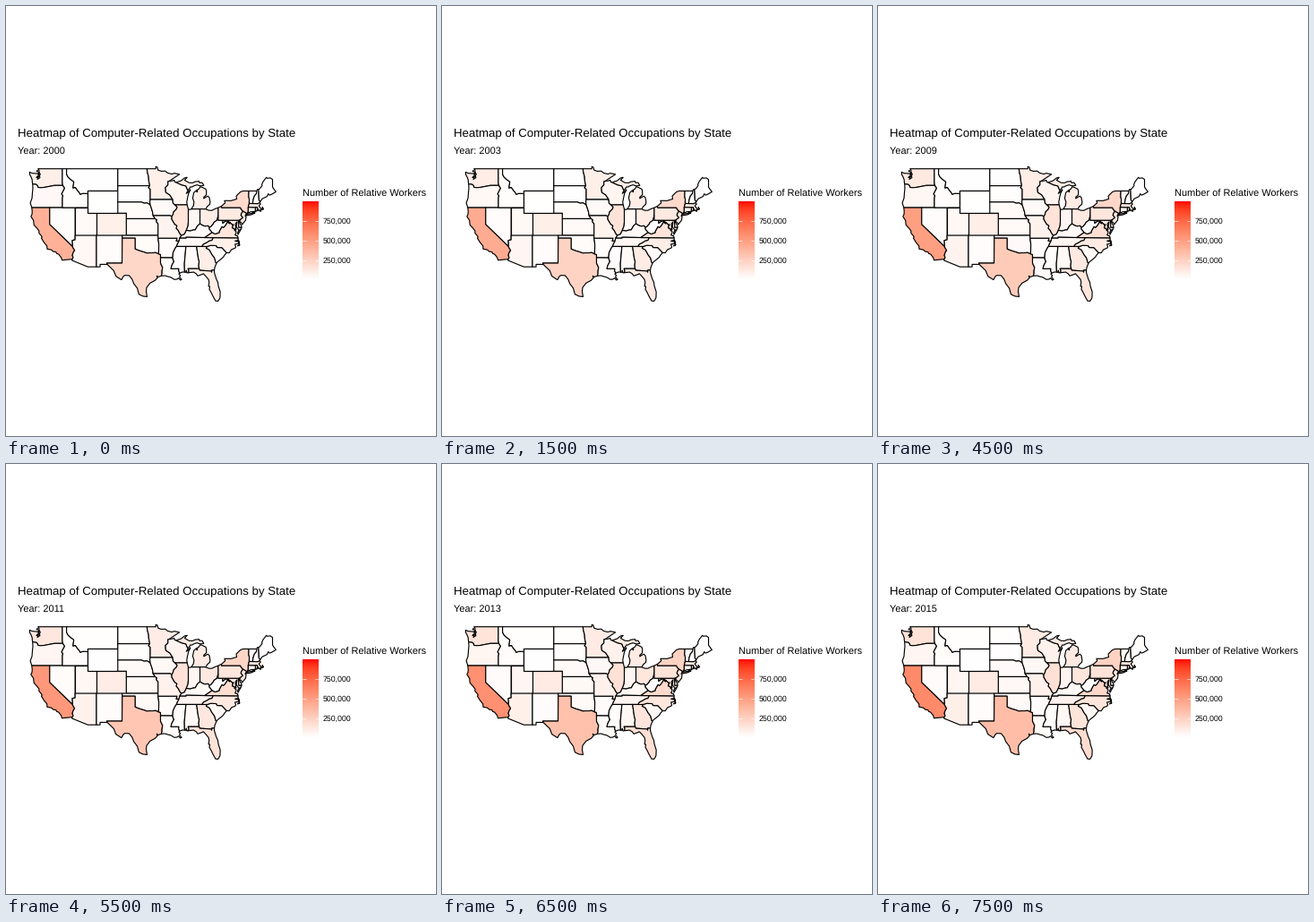
These frames come from a looping animation (480 px wide and 480 px high, 8000 ms). A matplotlib script:

```python
import numpy as np
import matplotlib.pyplot as plt
from matplotlib.animation import FuncAnimation
from matplotlib.collections import PolyCollection

plt.rcParams.update({"font.family": "Liberation Sans", "text.hinting": "none"})

SIZE, DPI = 480, 100
PT = 72 / DPI
TOP = 988  # thousands of workers at full red


def path(*v):
    """Pairs of degrees west and degrees north."""
    return np.array(v, float).reshape(-1, 2)


def ring(first, *rest):
    """Join border pieces end to end, flipping each where needed."""
    if rest:
        ends = rest[0][[0, -1]]
        gap = lambda p: np.hypot(*(ends - p).T).min()
        if gap(first[0]) < gap(first[-1]):
            first = first[::-1]
    out = first
    for part in rest:
        d = np.hypot(*(part[[0, -1]] - out[-1]).T)
        out = np.vstack([out, part if d[0] <= d[1] else part[::-1]])
    return out


def project(p):
    return np.c_[26.5 + (124.68 - p[:, 0]) * 4.765,
                 181.7 + (49 - p[:, 1]) * 6.196]


def shade(t):
    """White to red through CIE Lab."""
    t = np.clip(np.asarray(t, float), 0, 1)
    fy = (116 - 46.76 * t) / 116
    f = np.stack([fy + 80.09 * t / 500, fy, fy - 67.2 * t / 200], -1)
    xyz = np.where(f > 6 / 29, f ** 3, (f - 4 / 29) * 0.12842)
    xyz = xyz * [0.95047, 1, 1.08883]
    m = np.array([[3.2406, -1.5372, -0.4986],
                  [-0.9689, 1.8758, 0.0415],
                  [0.0557, -0.2040, 1.0570]])
    lin = np.clip(xyz @ m.T, 0, 1)
    return np.where(lin < 0.0031308, 12.92 * lin, 1.055 * lin ** (1 / 2.4) - 0.055)


shapes, start, final = [], [], []


def state(v0, v1, *parts):
    shapes.append(project(ring(*parts)))
    start.append(v0)
    final.append(v1)


# Western borders
wa_coast = path(124, 46.25, 124.1, 46.7, 124.1, 47, 124.35, 47.5, 124.7, 48, 124.7, 48.4,
                124.1, 48.2, 123.2, 48.15, 122.75, 48.1, 122.6, 47.85, 123.1, 47.4,
                122.6, 47.6, 122.9, 47.1, 122.3, 47.4, 122.4, 47.8, 122.2, 48, 122.5, 48.4,
                122.5, 48.75, 122.75, 49)
wa_or = path(124, 46.25, 123.4, 46.2, 123.1, 46.15, 122.8, 45.9, 122.75, 45.65, 122.2, 45.6,
             121.2, 45.65, 120.6, 45.75, 119.9, 45.85, 119.3, 45.93, 118.95, 46, 116.92, 46)
wa_id = path(116.92, 46, 117.04, 46.43, 117.04, 49)
or_id = path(116.92, 46, 116.5, 45.5, 116.85, 45, 117.2, 44.45, 116.9, 44.15,
             117.03, 43.8, 117.03, 42)
or_coast = path(124.2, 42, 124.4, 42.5, 124.55, 42.85, 124.15, 43.7, 124.05, 44.7,
                123.95, 45.5, 124, 46.25)
ca_coast = path(124.2, 42, 124.1, 41.3, 124.15, 40.8, 124.4, 40.4, 123.8, 39.7, 123.7, 38.9,
                123, 38.3, 122.5, 37.8, 122.5, 37.4, 122, 36.95, 121.8, 36.7, 121.95, 36.5,
                121.3, 35.7, 120.65, 35.1, 120.6, 34.55, 119.6, 34.4, 119.2, 34.1, 118.5, 34,
                118.4, 33.75, 117.9, 33.6, 117.3, 33, 117.12, 32.53)
ca_az = path(114.72, 32.72, 114.5, 33, 114.7, 33.4, 114.5, 33.9, 114.15, 34.3,
             114.6, 34.85, 114.63, 35)
nv_az = path(114.63, 35, 114.7, 36.1, 114.05, 36.2, 114.05, 37)
id_mt = path(111.05, 44.5, 111.5, 44.55, 112.3, 44.55, 112.85, 44.4, 113.1, 44.75,
             113.5, 45.1, 114, 45.65, 114.55, 45.55, 114.35, 46.65, 115.3, 47.2,
             115.7, 47.5, 116.05, 48, 116.05, 49)

# Plains
nd_mn = path(97.23, 49, 97.1, 48.3, 96.85, 47.6, 96.8, 46.9, 96.56, 45.94)
sd_mn = path(96.56, 45.94, 96.85, 45.6, 96.45, 45.3, 96.45, 43.5)
sd_ia = path(96.45, 43.5, 96.55, 43.1, 96.45, 42.5)
sd_ne = path(104.05, 43, 98.5, 43, 97.9, 42.8, 97.2, 42.85, 96.45, 42.5)
ne_ia = path(96.45, 42.5, 96.1, 41.7, 95.9, 41.2, 95.8, 40.6)
ne_mo = path(95.8, 40.6, 95.3, 40)
ks_mo = path(95.3, 40, 94.9, 39.8, 95.05, 39.5, 94.62, 39.1, 94.62, 37)
ok_ar = path(94.62, 36.5, 94.43, 35.4, 94.48, 33.65)
red = path(94.48, 33.65, 95.2, 33.9, 95.8, 33.85, 96.6, 33.85, 97.2, 33.8, 97.95, 34,
           98.6, 34.15, 99.2, 34.3, 100, 34.55, 100, 36.5, 103, 36.5)
tx_nm = path(106.53, 31.78, 106.62, 32, 103.06, 32, 103, 36.5)
tx_ar = path(94.48, 33.65, 94.04, 33.55, 94.04, 33.02)
tx_la = path(93.85, 29.7, 93.7, 30.1, 93.7, 30.6, 93.55, 31.2, 94.04, 32, 94.04, 33.02)
tx_coast = path(97.2, 25.95, 97.4, 26.9, 97.3, 27.6, 96.5, 28.4, 95.3, 28.9, 94.75, 29.35,
                94.9, 29.7, 94.6, 29.5, 93.85, 29.7)
rio = path(106.53, 31.78, 105, 30.65, 104.5, 29.65, 103.2, 29, 102.7, 29.65, 102.4, 29.8,
           101.4, 29.77, 100.7, 29.1, 100.3, 28.3, 99.5, 27.5, 99.1, 26.4, 98.2, 26.05,
           97.2, 25.95)

# Mississippi and Gulf
la_ms = path(91.2, 33, 91.1, 32.6, 90.9, 32.3, 91.4, 31.6, 91.6, 31, 89.75, 31,
             89.8, 30.6, 89.55, 30.2)
la_coast = path(89.55, 30.2, 89.75, 30.05, 89.4, 29.8, 89.6, 29.5, 89.1, 29.05, 89.4, 28.95,
                89.8, 29.3, 90.2, 29.1, 90.8, 29.05, 91.3, 29.3, 91.8, 29.5, 92.2, 29.55,
                93, 29.75, 93.85, 29.7)
ar_mo = path(94.62, 36.5, 90.15, 36.5, 90.35, 36, 89.7, 36)
ar_tn = path(89.7, 36, 90.1, 35.4, 90.3, 35)
ar_ms = path(90.3, 35, 90.6, 34.7, 90.9, 34.2, 91.1, 33.9, 91.2, 33)
mo_tn = path(89.7, 36, 89.55, 36.5)
mo_ky = path(89.55, 36.5, 89.15, 37)
mo_il = path(89.15, 37, 89.5, 37.3, 89.9, 37.9, 90.35, 38.3, 90.2, 38.75, 90.7, 39,
             91.4, 39.9, 91.4, 40.4)
mo_ia = path(91.4, 40.4, 91.75, 40.6, 95.8, 40.6)
ia_il = path(91.4, 40.4, 91.1, 40.8, 91, 41.2, 90.3, 41.75, 90.15, 42.1, 90.65, 42.5)
ia_wi = path(90.65, 42.5, 91.1, 42.8, 91.2, 43.5)
al_ms = path(88.2, 35, 88.1, 34.9, 88.45, 31.9, 88.4, 30.37)
ms_coast = path(89.55, 30.2, 88.9, 30.4, 88.4, 30.37)
al_coast = path(88.4, 30.37, 88.1, 30.35, 88, 30.7, 87.85, 30.25, 87.5, 30.28)
fl_al = path(87.5, 30.28, 87.4, 30.65, 87.6, 31)
fl_coast = path(81.45, 30.72, 81.4, 30.2, 81, 29.2, 80.6, 28.5, 80.5, 27.9, 80.05, 26.8,
                80.1, 25.8, 80.35, 25.4, 80.6, 25.15, 81.15, 25.2, 81.8, 26.1, 82.1, 26.6,
                82.6, 27.3, 82.5, 27.8, 82.8, 27.85, 82.65, 28.5, 82.8, 29.05, 83.4, 29.6,
                84, 30.1, 84.4, 29.95, 85.3, 29.7, 85.7, 30.1, 86.3, 30.38, 87.5, 30.28)

# Great Lakes
mn_wi = path(91.2, 43.5, 91.9, 44.3, 92.8, 44.75, 92.9, 45.6, 92.3, 46.1, 92.3, 46.7, 92.05, 46.75)
mn_north = path(97.23, 49, 95.15, 49, 95.15, 49.38, 94.8, 49.3, 94.6, 48.75, 93.8, 48.55,
                92.95, 48.6, 92.4, 48.25, 91.4, 48.05, 90.8, 48.2, 89.6, 48)
mn_shore = path(89.6, 48, 90.8, 47.4, 92.05, 46.75)
wi_north = path(92.05, 46.75, 91.2, 46.85, 90.8, 46.95, 90.75, 46.65, 90.4, 46.55)
wi_mi = path(90.4, 46.55, 89.1, 46.1, 88.1, 45.9, 87.8, 45.35, 87.6, 45.1)
wi_lake = path(87.6, 45.1, 88, 44.55, 87.4, 44.9, 87.05, 45.25, 87.5, 44.5, 87.7, 43.8,
               87.9, 43, 87.8, 42.5)
mi_upper = path(90.4, 46.55, 89.2, 46.85, 88.4, 47.35, 87.8, 47.45, 88.4, 46.95, 87.4, 46.5,
                86.6, 46.45, 85.9, 46.68, 85, 46.75, 84.9, 46.48, 84.3, 46.5, 83.9, 46,
                84.7, 45.9, 85.5, 46.1, 86.3, 45.9, 86.7, 45.7, 87, 45.75, 87.6, 45.1)
mi_lower = path(86.8, 41.76, 86.3, 42.4, 86.2, 43, 86.5, 43.7, 86.25, 44.7, 85.6, 45.15,
                85.5, 44.8, 85.3, 45.3, 85, 45.4, 84.75, 45.78, 84.2, 45.63, 83.45, 45.35,
                83.3, 45, 83.3, 44.3, 83.9, 43.9, 83.9, 43.65, 83.4, 43.9, 82.95, 44.07,
                82.6, 43.8, 82.42, 43, 82.5, 42.6, 83.1, 42.2, 83.45, 41.73)
il_lake = path(87.8, 42.5, 87.6, 41.9, 87.53, 41.7)
il_in = path(87.53, 41.7, 87.53, 39.35, 87.6, 38.7, 88, 37.9)
in_lake = path(87.53, 41.7, 87.1, 41.65, 86.8, 41.76)
in_oh = path(84.8, 41.76, 84.8, 39.1)
oh_lake = path(83.45, 41.73, 82.7, 41.5, 82, 41.5, 81.3, 41.77, 80.52, 41.98)

# Ohio valley and Appalachia
il_ky = path(88, 37.9, 88.45, 37.2, 89.15, 37)
in_ky = path(88, 37.9, 87.1, 37.8, 86.5, 37.95, 85.9, 38, 85.4, 38.7, 84.8, 39.1)
oh_ky = path(84.8, 39.1, 84.2, 38.8, 83.6, 38.65, 82.9, 38.73, 82.6, 38.4)
oh_wv = path(82.6, 38.4, 82.2, 38.6, 81.75, 39, 81.5, 39.35, 80.85, 39.7, 80.6, 40.3, 80.52, 40.64)
oh_pa = path(80.52, 41.98, 80.52, 40.64)
pa_wv = path(80.52, 40.64, 80.52, 39.72)
wv_ky = path(81.95, 37.53, 82.6, 38.15, 82.6, 38.4)
wv_va = path(77.72, 39.32, 77.83, 39.13, 78.35, 39.42, 78.87, 38.77, 79.3, 38.42, 79.65, 38.58,
             80.3, 37.7, 80.3, 37.5, 81.25, 37.25, 81.95, 37.53)
va_ky = path(81.95, 37.53, 83.68, 36.6)
ky_tn = path(89.55, 36.5, 88.05, 36.5, 88.05, 36.66, 83.68, 36.6)
tn_nc = path(81.68, 36.59, 82, 36.1, 82.6, 36, 83.2, 35.7, 84, 35.4, 84.32, 35)
va_south = path(75.87, 36.55, 81.68, 36.59)
nc_sc = path(83.1, 35, 82.3, 35.2, 81.05, 35.15, 80.9, 35.07, 80.8, 34.82, 79.68, 34.8, 78.55, 33.87)
sc_ga = path(83.1, 35, 83.35, 34.7, 82.6, 34.4, 81.95, 33.5, 81.4, 32.95, 81.1, 32.1, 80.9, 32.05)
ga_al = path(85.6, 35, 85.2, 32.87, 85, 32.3, 85.1, 31.6, 85, 31)
ga_fl = path(85, 31, 84.86, 30.7, 82.2, 30.57, 82.05, 30.36, 82, 30.75, 81.45, 30.72)

# Atlantic
ga_coast = path(81.45, 30.72, 81.3, 31.3, 80.9, 32.05)
sc_coast = path(78.55, 33.87, 79.1, 33.4, 79.3, 33.1, 79.9, 32.7, 80.5, 32.35, 80.9, 32.05)
nc_coast = path(75.87, 36.55, 75.9, 36.1, 76.6, 36, 75.75, 35.85, 75.8, 35.5, 76.6, 35.4,
                76.4, 34.9, 76.6, 34.7, 77.4, 34.45, 77.95, 33.85, 78.55, 33.87)
va_coast = path(76.35, 38, 76.8, 38, 76.3, 37.65, 76.4, 37.3, 76.6, 37.1, 76.3, 36.95,
                76, 36.92, 75.87, 36.55)
md_va = path(77.72, 39.32, 77.45, 39.1, 77.05, 38.85, 77.25, 38.35, 76.9, 38.27, 76.35, 38)
md_wv = path(79.48, 39.2, 78.8, 39.6, 78.4, 39.6, 77.72, 39.32)
md_bay = path(76.35, 38, 76.45, 38.5, 76.5, 39.1, 76.1, 39.45, 76.2, 39, 76.3, 38.6,
              75.95, 38.2, 75.65, 37.95)
de_md = path(75.05, 38.45, 75.7, 38.45, 75.79, 39.72)
de_coast = path(75.4, 39.8, 75.55, 39.45, 75.4, 39.1, 75.1, 38.8, 75.05, 38.45)
pa_de = path(75.4, 39.8, 75.79, 39.72)
pa_nj = path(74.7, 41.36, 75.1, 40.95, 75.2, 40.65, 74.75, 40.2, 75.4, 39.8)
pa_ny = path(74.7, 41.36, 75.05, 41.6, 75.35, 42, 79.76, 42, 79.76, 42.27)
ny_nj = path(74.7, 41.36, 73.9, 41)
nj_coast = path(73.9, 41, 74.2, 40.5, 74, 40.4, 74.1, 39.75, 74.9, 38.95, 75, 39.2,
                75.5, 39.5, 75.4, 39.8)
ny_lakes = path(79.76, 42.27, 78.9, 42.85, 79.05, 43.26, 77.5, 43.25, 76.2, 43.55, 76.3, 44.1,
                75.3, 44.85, 74.7, 45, 73.35, 45)
ny_vt = path(73.35, 45, 73.4, 44, 73.25, 43.55, 73.27, 42.75)
ny_ma = path(73.27, 42.75, 73.5, 42.05)
ny_ct = path(73.5, 42.05, 73.5, 41.3, 73.65, 41)

# New England
vt_nh = path(71.5, 45, 71.6, 44.5, 72.05, 44.1, 72.35, 43.4, 72.45, 42.73)
nh_ma = path(70.82, 42.87, 71.3, 42.7, 72.45, 42.73)
nh_me = path(71.08, 45.3, 70.98, 43.4, 70.7, 43.07)
me_north = path(71.08, 45.3, 70.8, 45.4, 70.25, 45.95, 70.3, 46.2, 70, 46.7, 69.23, 47.45,
                69.05, 47.3, 68.3, 47.35, 67.8, 47.07, 67.8, 45.7, 67.45, 45.3, 67, 44.85)
me_coast = path(67, 44.85, 68, 44.4, 68.5, 44.25, 68.8, 44.5, 69.1, 44, 69.8, 43.75,
                70.2, 43.6, 70.7, 43.07)
ma_coast = path(70.82, 42.87, 70.6, 42.65, 71, 42.3, 70.65, 41.95, 70.5, 41.78, 70, 41.8,
                70.2, 42.07, 69.95, 41.7, 70.65, 41.55, 71.12, 41.5)
ma_ri = path(71.12, 41.5, 71.35, 41.85, 71.38, 42.02, 71.8, 42.02)
ma_ct = path(71.8, 42.02, 73.5, 42.05)
ri_ct = path(71.8, 42.02, 71.85, 41.32)
ri_coast = path(71.12, 41.5, 71.4, 41.5, 71.35, 41.75, 71.5, 41.37, 71.85, 41.32)
ct_coast = path(71.85, 41.32, 72.9, 41.25, 73.65, 41)

# Each state: thousands of workers in the first and last year, then its border
state(85, 150, wa_coast, wa_id, wa_or)
state(85, 150, path(122.7, 48.15, 122.5, 47.95, 122.5, 48.35))
state(85, 150, path(123.1, 48.55, 122.8, 48.45, 122.85, 48.7))
state(35, 50, or_coast, wa_or, or_id)
state(400, 590, ca_coast, ca_az, path(120, 39, 120, 42))
state(13, 20, nv_az, path(114.05, 42, 120, 42, 120, 39))
state(12, 18, or_id, wa_id, id_mt, path(111.05, 42))
state(4, 7, id_mt, path(111.05, 45, 104.05, 45, 104.05, 49))
state(2, 3, path(111.05, 41, 104.05, 41, 104.05, 45, 111.05, 45))
state(30, 48, path(114.05, 37, 109.05, 37, 109.05, 41, 111.05, 41, 111.05, 42, 114.05, 42))
state(80, 105, path(109.05, 37, 102.05, 37, 102.05, 41, 109.05, 41))
state(38, 85, ca_az, nv_az,
      path(114.05, 37, 109.05, 37, 109.05, 31.33, 111.07, 31.33, 114.8, 32.5))
state(14, 16, tx_nm, path(103, 37, 109.05, 37, 109.05, 31.33, 108.2, 31.33, 108.2, 31.78))
state(4, 7, nd_mn, path(104.05, 45.94, 104.05, 49))
state(5, 8, sd_mn, sd_ia, sd_ne, path(104.05, 45, 104.05, 45.94))
state(22, 30, sd_ne, ne_ia, ne_mo, path(95.3, 40, 102.05, 40, 102.05, 41, 104.05, 41))
state(30, 34, ks_mo, path(94.62, 37, 102.05, 37, 102.05, 40))
state(22, 27, ok_ar, red, path(103, 37, 94.62, 37))
state(205, 340, tx_nm, red, tx_ar, tx_la, tx_coast, rio)
state(18, 22, tx_la, path(94.04, 33.02, 91.2, 33), la_ms, la_coast)
state(14, 20, ok_ar, ar_mo, ar_tn, ar_ms, path(91.2, 33, 94.04, 33.02), tx_ar)
state(60, 76, ar_mo, mo_tn, mo_ky, mo_il, mo_ia, ne_mo, ks_mo, path(94.62, 36.5))
state(27, 37, mo_ia, ia_il, ia_wi, path(91.2, 43.5, 96.45, 43.5), sd_ia, ne_ia)
state(80, 105, nd_mn, sd_mn, path(96.45, 43.5, 91.2, 43.5), mn_wi, mn_shore, mn_north)
state(48, 70, mn_wi, wi_north, wi_mi, wi_lake, path(87.8, 42.5, 90.65, 42.5), ia_wi)
state(140, 160, ia_il, path(90.65, 42.5, 87.8, 42.5), il_lake, il_in, il_ky, mo_il)
state(40, 55, il_in, in_lake, path(86.8, 41.76, 84.8, 41.76), in_oh, in_ky)
state(85, 110, mi_upper, wi_mi)
state(85, 110, mi_lower, path(84.8, 41.76))
state(95, 130, in_oh, path(84.8, 41.76, 83.45, 41.73), oh_lake, oh_pa, oh_wv, oh_ky)
state(25, 38, va_ky, wv_ky, oh_ky, in_ky, il_ky, mo_ky, ky_tn)
state(40, 65, ky_tn, path(83.68, 36.6, 81.68, 36.59), tn_nc, path(84.32, 35, 90.3, 35), ar_tn, mo_tn)
state(9, 11, path(90.3, 35, 88.2, 35), al_ms, ms_coast, la_ms, ar_ms)
state(26, 42, path(88.2, 35, 85.6, 35), ga_al, path(85, 31, 87.6, 31), fl_al, al_coast, al_ms)
state(90, 140, path(85.6, 35, 83.1, 35), sc_ga, ga_coast, ga_fl, ga_al)
state(95, 180, ga_fl, fl_coast, fl_al, path(87.6, 31, 85, 31))
state(22, 36, nc_sc, sc_coast, sc_ga)
state(78, 135, va_south, tn_nc, path(84.32, 35, 83.1, 35), nc_sc, nc_coast)
state(78, 135, path(75.8, 36.2, 75.5, 35.25, 76, 35.1, 75.55, 35.3))
state(135, 205, wv_va, md_va, va_coast, va_south, path(81.68, 36.59, 83.68, 36.6), va_ky)
state(135, 205, path(75.65, 37.95, 75.25, 38.03, 75.9, 37.15, 75.97, 37.5))
state(8, 10, pa_wv, path(80.52, 39.72, 79.48, 39.72, 79.48, 39.2), md_wv, wv_va, wv_ky, oh_wv)
state(85, 120, de_md, path(75.79, 39.72, 79.48, 39.72, 79.48, 39.2), md_wv, md_va, md_bay,
      path(75.65, 37.95, 75.25, 38.03))
state(35, 45, path(77.1, 38.93, 77, 38.98, 76.92, 38.88, 77.03, 38.8))
state(13, 15, de_coast, de_md, pa_de)
state(110, 150, oh_pa, pa_wv, path(80.52, 39.72, 75.79, 39.72), pa_de, pa_nj, pa_ny)
state(125, 135, ny_nj, pa_nj, nj_coast)
state(190, 235, ny_nj, pa_ny, ny_lakes, ny_vt, ny_ma, ny_ct, path(73.65, 41, 73.9, 40.8))
state(190, 235, path(74, 40.6, 73.75, 40.85, 72.6, 40.98, 72.3, 41.15, 72.6, 40.9,
                     71.9, 41.07, 72.8, 40.72, 74, 40.57))
state(6, 7, ny_vt, path(73.27, 42.75, 72.45, 42.73), vt_nh, path(71.5, 45, 73.35, 45))
state(18, 22, vt_nh, path(71.5, 45, 71.4, 45.25, 71.08, 45.3), nh_me,
      path(70.7, 43.07, 70.82, 42.87), nh_ma)
state(8, 10, nh_me, me_north, me_coast)
state(125, 145, path(73.27, 42.75, 72.45, 42.73), nh_ma, ma_coast, ma_ri, ma_ct, ny_ma)
state(125, 145, path(70.8, 41.4, 70.55, 41.45, 70.5, 41.36))
state(10, 13, ma_ri, ri_ct, ri_coast)
state(45, 46, ma_ct, ri_ct, ct_coast, ny_ct)

start, final = np.array(start, float), np.array(final, float)
growth = np.interp(np.arange(16), [0, 3, 6, 8, 9, 11, 13, 15], [0, 0.15, 0.3, 0.45, 0.47, 0.65, 0.85, 1])
SPIKE = 14  # the year with doubled counts

fig = plt.figure(figsize=(SIZE / DPI, SIZE / DPI), dpi=DPI, facecolor="white")
ax = fig.add_axes([0, 0, 1, 1])


def label(x, y, s, px):
    return ax.text(x, y, s, fontsize=px * PT, color="black", va="baseline")


usa = PolyCollection(shapes, edgecolors="black", linewidths=1.15 * PT, joinstyle="round")
ax.add_collection(usa)

label(13, 146, "Heatmap of Computer-Related Occupations by State", 13.2)
year = label(13, 165, "", 11)
label(331, 213, "Number of Relative Workers", 11)

x0, x1, y0, y1 = 331, 348.3, 219, 305.4
ax.imshow(shade(np.linspace(1, 0, 87))[:, None, :], extent=(x0, x1, y1, y0),
          aspect="auto", interpolation="bilinear")
for v in (250, 500, 750):
    y = y1 - v / TOP * (y1 - y0)
    ax.hlines([y, y], [x0, x1 - 3.5], [x0 + 3.5, x1], color="white", lw=0.7 * PT)
    label(353.7, y + 3.2, f"{v},000", 8.8)

ax.set_xlim(0, SIZE)
ax.set_ylim(SIZE, 0)
ax.axis("off")


def draw(i):
    workers = start + (final - start) * growth[i]
    if i == SPIKE:
        workers = workers * 2.05
    usa.set_facecolor(shade(workers / TOP))
    year.set_text(f"Year: {2000 + i}")
    return usa, year


anim = FuncAnimation(fig, draw, frames=16, init_func=lambda: draw(0),
                     interval=500, repeat=True, repeat_delay=0)
plt.show()
```
